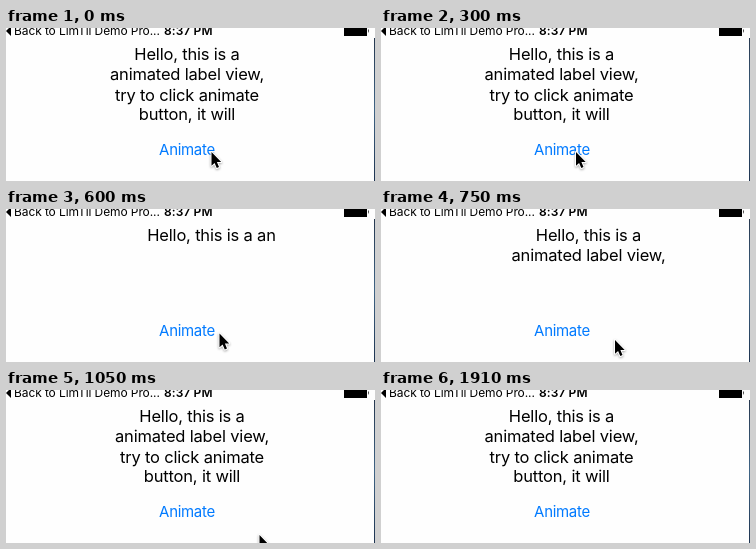
An HTML page for the animation above (2.01 s loop, 369x153 px).

```html
<!DOCTYPE html>
<html lang="en">
<head>
<meta charset="utf-8">
<title>Animated label</title>
<style>
  html, body { margin: 0; width: 100%; height: 100%; overflow: hidden; background: #fefefe; }
  svg { display: block; width: 369px; height: 153px; font-family: Inter, Roboto, sans-serif; }
  text { white-space: pre; }
  .status { font-size: 12px; letter-spacing: -.1px; }
  .time { font-size: 12px; font-weight: 600; letter-spacing: .1px; }
  .label { font-size: 16.5px; letter-spacing: -.18px; text-anchor: middle; }
  .button { font-size: 15px; letter-spacing: -.3px; fill: #007aff; text-anchor: middle; }
  #cursor { filter: drop-shadow(0 1px 1px #0005); }
</style>
</head>
<body>
<svg viewBox="0 0 369 153">
  <defs>
    <linearGradient id="edge" x2="0" y2="1">
      <stop offset="0" stop-color="#26384f"/>
      <stop offset=".5" stop-color="#3f6485"/>
      <stop offset="1" stop-color="#1d3350"/>
    </linearGradient>
  </defs>
  <rect width="369" height="153" fill="#fefefe"/>
  <path d="M0 3L5-2V8Z"/>
  <text class="status" x="8" y="7">Back to LimTil Demo Pro...</text>
  <text class="time" x="158" y="7">8:37 PM</text>
  <path d="M338-2H361V8H338ZM362 1Q363.5 2.5 362 5Z"/>
  <rect x="368" y="10" width="1" height="143" fill="url(#edge)"/>
  <g id="label"></g>
  <text id="button" class="button" x="181" y="127">Animate</text>
  <g id="cursor">
    <path d="M.5 .5V14.2L3.6 11.4L5.8 16.5L8 15.5L5.9 10.5H10.2Z"
          stroke="#fff" stroke-width="2" paint-order="stroke" stroke-linejoin="round"/>
  </g>
</svg>
<script>
const LOOP = 2010;
const MESSAGE = 'Hello, this is a animated label view, try to click animate button, it will';
const BREAKS = [16, 37, 58];   // spaces where the label wraps
const ONE_LINE = 21;           // longest text that still fits on the first line
const FULL = MESSAGE.length;

// start ms, typed letters, label centre, cursor x, cursor y, button opacity
const STEPS = [
  [0,    FULL, 181,   205, 123.5, 1],
  [150,  FULL, 180.5, 201, 123.5, 1],
  [300,  FULL, 180.5, 194.5, 123.5, 1],
  [450,  2,    187,   194.5, 123.5, .22],
  [600,  19,   205.5, 213, 124, 1],
  [750,  37,   207.5, 233.5, 130.5, 1],
  [900,  56,   197,   245, 138, 1],
  [1050, FULL, 186,   253, 144.5, 1],
  [1190, FULL, 180.5, 258, 148, 1],
  [1340, FULL, 180.5, 258, 160, 1]
];

const $ = id => document.getElementById(id);
const lines = [32, 52, 72.5, 92].map(y => {
  const line = document.createElementNS('http://www.w3.org/2000/svg', 'text');
  line.setAttribute('class', 'label');
  line.setAttribute('y', y);
  $('label').append(line);
  return line;
});

function wrap(count) {
  if (count <= ONE_LINE) return [MESSAGE.slice(0, count)];
  const starts = [0, ...BREAKS.map(b => b + 1)];
  return starts.map((s, i) => MESSAGE.slice(s, Math.min(count, BREAKS[i] ?? FULL)));
}

let shown;
function draw(now) {
  const t = now % LOOP;
  const step = STEPS.findLast(s => s[0] <= t);
  if (step !== shown) {
    shown = step;
    const [, count, centre, x, y, opacity] = step;
    const parts = wrap(count);
    lines.forEach((line, i) => {
      line.textContent = parts[i] || '';
      line.setAttribute('x', centre);
    });
    $('cursor').setAttribute('transform', `translate(${x} ${y})`);
    $('button').setAttribute('opacity', opacity);
  }
}

const start = performance.now();
function tick() {
  draw(performance.now() - start);
  requestAnimationFrame(tick);
}
tick();
</script>
</body>
</html>
```
